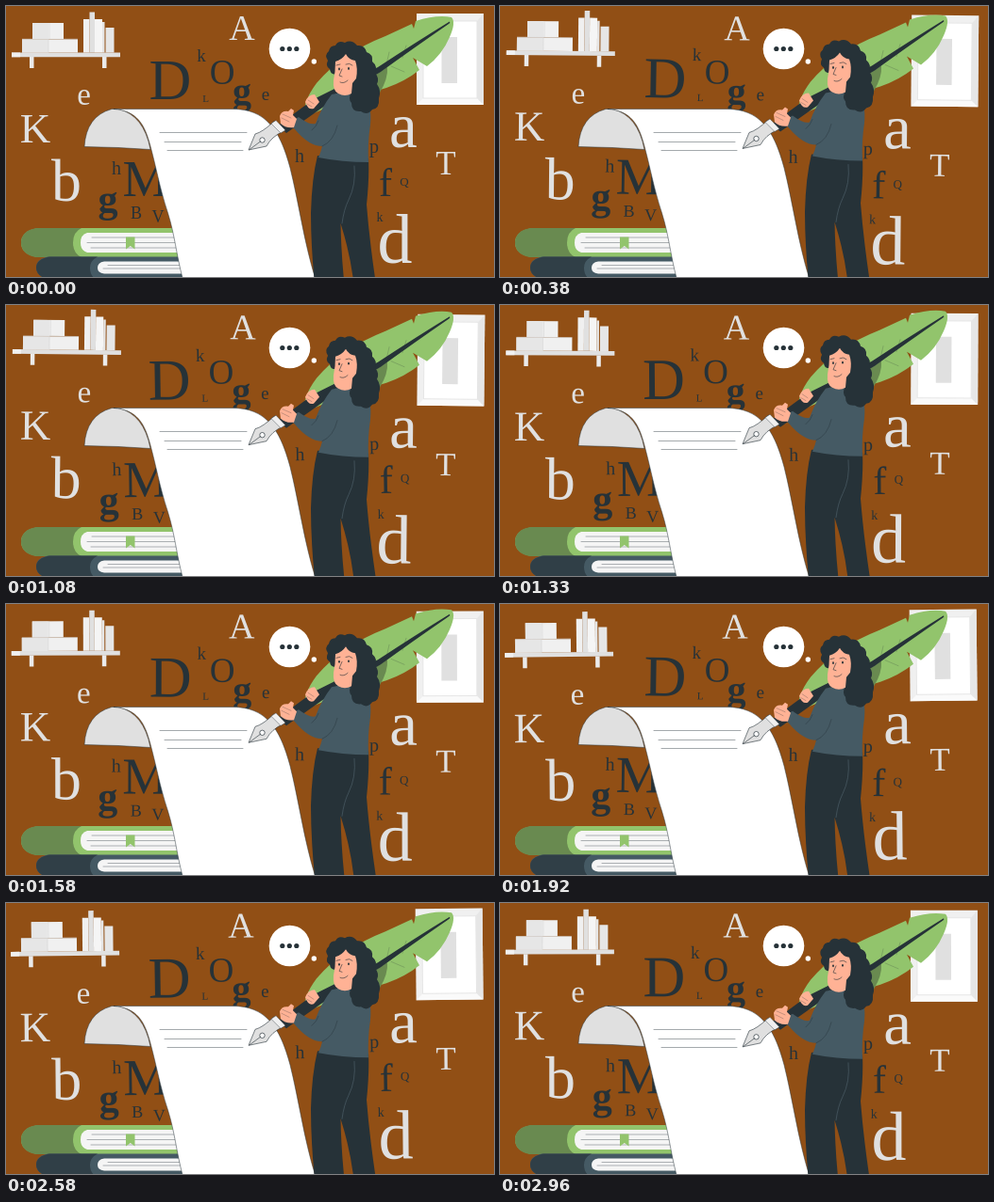
Animation, 517 px wide and 288 px high, one loop 3 s. Source, as an HTML page:

```html
<!DOCTYPE html>
<html lang="en">
<head>
<meta charset="utf-8">
<title>Writer with a quill</title>
<style>
  html, body { margin: 0; width: 100%; height: 100%; overflow: hidden; background: #914f15; }
  svg { display: block; width: 100vw; height: 100vh; }
  text { font-family: "Liberation Serif", "Noto Serif", serif; text-anchor: middle; }
  .ink { fill: none; stroke: #263238; stroke-width: .6; stroke-linecap: round; stroke-linejoin: round; }
</style>
</head>
<body>
<svg viewBox="0 0 517 288" preserveAspectRatio="xMidYMid slice">
  <rect width="517" height="288" fill="#914f15"/>

  <g id="backdrop">
    <g id="shelf">
      <path d="M25 54h4.500v12H25zM102 54h4.500v12H102z" fill="#ebebeb"/>
      <path d="M6 49.500h115v4.700H6z" fill="#e0e0e0"/>
      <path d="M6 49.500h9v4.700H6z" fill="#f0f0f0"/>
      <path d="M28 18h33v17H28zM17 35.500h59v14H17z" fill="#f0f0f0"/>
      <path d="M28 18h17v17H28zM17 35.500h28v14H17z" fill="#e6e6e6"/>
      <path d="M46 18v17M45 35.500v14M17 35.300h59" stroke="#d8d8d8" stroke-width=".7"/>
      <path d="M82 14h6.500v35.500H82z" fill="#f0f0f0"/>
      <path d="M88.500 6.500H94v43h-5.500z" fill="#e0e0e0"/>
      <path d="M94 14h8v35.500h-8z" fill="#f5f5f5"/>
      <path d="M102 17h2.500v32.500H102zM105.500 23h9v26.500h-9z" fill="#e6e6e6"/>
    </g>
    <g id="picture">
      <path d="M435 8h71v97h-71z" fill="#f0f0f0"/>
      <path d="M435 105l7-7h57l7 7z" fill="#fafafa"/>
      <path d="M506 8l-7 8v82l7 7z" fill="#e6e6e6"/>
      <path d="M442 16h57v82h-57z" fill="#fff" stroke="#e6e6e6"/>
      <path d="M461.500 33H478v49h-16.500z" fill="#e0e0e0"/>
    </g>
    <g id="lightLetters" fill="#e0e0e0"></g>
  </g>

  <g id="darkLetters" fill="#263238"></g>

  <g id="books">
    <path d="M46 236H190v31H34q-18-3-18-15.500T34 236z" fill="#92c46c"/>
    <path d="M32 236H80q-9 4-9 15.500T80 267H32q-16-3-16-15.500T32 236z" fill="#698a50"/>
    <path d="M190 241H86q-7 2-7 10.500T86 262H190z" fill="#f5f5f5"/>
    <path class="ink" d="M91 246H190M86 251.500H190M90 257H190" stroke-opacity=".6"/>
    <path d="M127 245.500h9.500v13l-4.700-3.500-4.800 3.500z" fill="#92c46c"/>
    <path d="M44 266.500H195V289H40q-8-4-8-11 0-9 12-11.500z" fill="#455a64"/>
    <path d="M46 266.500H97q-8 4-8 12 0 6 4 10.500H40q-8-4-8-11 0-9 14-11.500z" fill="#303f47"/>
    <path d="M195 271.500H104q-7 1-7 7 0 5 7 6H195z" fill="#f5f5f5"/>
    <path class="ink" d="M108 275.500H190M103 279H190" stroke-opacity=".6"/>
  </g>

  <g id="paper" stroke="#263238" stroke-width=".5">
    <path d="M112 109.500Q85 117 83 149.500Q120 150 153 152.500Q146 116 119 109.500z" fill="#e0e0e0"/>
    <path d="M114 109.500H240C275 109.500 290 131 301 172C310 208 315.500 250 327.500 289H187C180 262 179 244 171.500 220C162 190 160 175 153 149C147 125 138 111 114 109.500z" fill="#fff"/>
    <path class="ink" d="M163 134.500H255M168 144.500H249M171 153.500H251" stroke-opacity=".7"/>
  </g>

  <g id="bubble">
    <circle cx="300.500" cy="45.500" r="21.800" fill="#fff"/>
    <circle cx="326.300" cy="59" r="2.700" fill="#fff"/>
    <g fill="#263238">
      <circle cx="292.800" cy="45.500" r="2.600"/><circle cx="300.300" cy="45.500" r="2.600"/><circle cx="307.800" cy="45.500" r="2.600"/>
    </g>
  </g>

  <g id="writer">
    <g id="quill">
      <path d="M316 118Q314 102 329 82Q356 50 402 32L430 19L432 24L434 16Q456 9 472 12Q477 17 470 33Q462 52 446 64L431 55L438 68Q423 80 403 87Q360 99 316 118z" fill="#92c46c"/>
      <path d="M387 76L404 65Q405 77 396 92L378 96z" fill="#698a50"/>
      <path class="ink" d="M402 67L406 49M420 55L424 42M408 64L422 70" stroke-opacity=".35"/>
      <path d="M470 16.500Q471 18 469 19Q430 46 397 70L345 101L297 135L288 127L326 99L394 65Q435 38 470 16.500z" fill="#263238"/>
      <path d="M257 153L264 136Q272 134 284 122.500L294 133Q281 139 276 149z" fill="#e0e0e0" stroke="#263238" stroke-width=".6"/>
      <path d="M281 125L286 121.500L296 132L291 135z" fill="#f0f0f0" stroke="#263238" stroke-width=".4"/>
      <circle cx="271.500" cy="142.500" r="2.700" fill="#fff" stroke="#263238" stroke-width=".7"/>
      <path class="ink" d="M258 152.500L269.500 144"/>
    </g>

    <g id="legs">
      <path d="M330 159L384 162Q385 183 382 211Q385 249 392 296H368.500Q365 264 354.500 231Q355 262 358.500 296H327Q323 254 323 220Q324 183 330 159z" fill="#263238"/>
      <path class="ink" d="M369 170Q371 190 363 206Q358 216 356 231" style="stroke:#53666f"/>
    </g>

    <g id="torso">
      <path d="M345 94Q363 89 379 96Q388 104 386 126Q383 145 384 166Q356 166 331 161Q334 154 335 149Q321 149 306 131Q301 127 303 122L310 118Q322 127 328 125Q334 108 345 94z" fill="#455a64"/>
      <path class="ink" d="M335 149Q347 144 351 127M324 132Q329 128 331 122" stroke-opacity=".7"/>
      <path d="M317 102Q320 94 327 94L332 102L326 109Q320 111 317 102z" fill="#ffb295"/>
      <path d="M290 117Q292 111 299 112L302 109L305 111L304 116L308 120L305 129Q296 130 291 125z" fill="#ffb295"/>
      <path class="ink" d="M292 119L300 123M293 115L302 119M319 104L324 107M320 100L326 104" stroke-opacity=".45"/>
    </g>

    <g id="head">
      <path d="M349 42Q352 36 359 39Q366 35 372 42Q380 41 382 49Q389 51 388 59Q394 64 391 71Q396 77 393 83Q398 90 395 98Q396 109 388 110Q383 117 376 112Q366 113 366 103Q362 99 366 91L350 72Q344 74 343 67Q338 64 341 58Q337 52 342 48Q343 42 349 42z" fill="#263238"/>
      <path d="M349 59Q356 57 360 51Q363 57 370 58Q373 66 371 77L367 82L366 93Q359 97 352 93Q346 90 347 79Q349 70 349 59z" fill="#ffb295"/>
      <path class="ink" d="M350 63L354 62M360 62Q364 60 367 63M356 67L353 74L356 75M354 81Q358 83 362 79" stroke-width=".9"/>
      <ellipse cx="353" cy="67" rx=".9" ry="1.400" fill="#263238"/>
      <ellipse cx="363" cy="66.500" rx=".9" ry="1.400" fill="#263238"/>
    </g>
  </g>
</svg>
<script>
const LOOP = 3000;
const byId = id => document.getElementById(id);

// Each entry: letter, centre x, baseline y, size, optional weight.
function addLetters(group, letters) {
  for (const [char, x, y, size, weight = "normal"] of letters) {
    const node = document.createElementNS("http://www.w3.org/2000/svg", "text");
    const attrs = { x, y, "font-size": size, "font-weight": weight };
    for (const key in attrs) node.setAttribute(key, attrs[key]);
    node.textContent = char;
    group.append(node);
  }
}

addLetters(byId("lightLetters"), [
  ["A", 250, 36.5, 38], ["e", 82.5, 105, 33], ["K", 31, 145, 45], ["b", 64, 207, 64],
  ["a", 421, 150, 67], ["T", 466, 179, 35], ["d", 412, 273, 74]
]);
addLetters(byId("darkLetters"), [
  ["D", 174, 99, 62], ["k", 207, 59, 19], ["O", 229, 83, 37], ["L", 211.5, 102, 11],
  ["g", 250, 104, 40, "bold"], ["e", 275, 100, 19], ["h", 117, 179, 20], ["M", 148, 202, 55],
  ["g", 108, 219, 42, "bold"], ["B", 138, 226, 18], ["V", 161, 230, 18], ["h", 311, 166, 20],
  ["p", 390, 156, 20], ["f", 402, 202, 42], ["Q", 422, 191, 13], ["k", 396, 229, 14]
]);

// Triangle wave: 0, 1, 0, -1 at the quarters of the period.
function sway(t, period) {
  const p = (t / period + 0.25) % 1;
  return 1 - Math.abs(p * 4 - 2);
}

function draw(t) {
  const lift = 1 - Math.abs(1 - t / LOOP * 2);
  byId("backdrop").setAttribute("transform", `rotate(${sway(t, LOOP)} 257 145)`);
  byId("darkLetters").setAttribute("transform", `rotate(${sway(t, LOOP / 2)} 263 140)`);
  byId("writer").setAttribute("transform", `translate(0 ${-6 * lift})`);
}

const start = performance.now();
function tick() {
  draw((performance.now() - start) % LOOP);
  requestAnimationFrame(tick);
}
draw(0);
tick();
</script>
</body>
</html>
```
